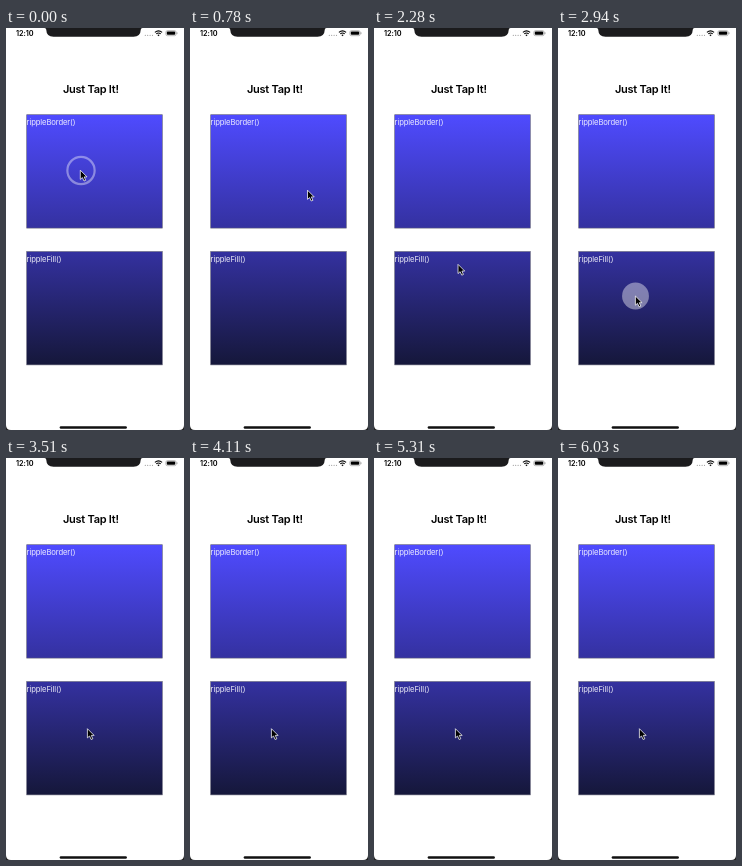
An HTML page that plays this animation: 178 by 402 pixels, repeating every 6060 ms.

```html
<!DOCTYPE html>
<html lang="en">
<head>
<meta charset="utf-8">
<title>Ripple demo</title>
<style>
html, body { margin: 0; width: 100%; height: 100%; overflow: hidden; background: #222; }
svg { display: block; width: 100vw; height: 100vh; }
text { font-family: Inter, "Liberation Sans", sans-serif; }
.label { font-size: 7.7px; letter-spacing: -.13px; fill: #fff; fill-opacity: .9; }
.card { stroke: #66667a; stroke-width: .6; }
</style>
</head>
<body>
<svg viewBox="0 0 178 402" preserveAspectRatio="none">
  <defs>
    <linearGradient id="bright" x2="0" y2="1">
      <stop stop-color="#4f4bff"/><stop offset="1" stop-color="#3431a0"/>
    </linearGradient>
    <linearGradient id="dark" x2="0" y2="1">
      <stop stop-color="#3431a0"/><stop offset="1" stop-color="#15173a"/>
    </linearGradient>
  </defs>
  <path d="M0 0H178V397Q178 402 173 402H5Q0 402 0 397Z" fill="#fff"/>

  <!-- status bar -->
  <path d="M38.5 0Q40.2 0 40.2 1.5Q40.5 8.8 47.5 8.8H127.5Q134.5 8.8 134.8 1.5Q134.8 0 136.5 0Z" fill="#1b1b1d"/>
  <text x="10" y="8.2" font-size="7.3" font-weight="600" letter-spacing="-.05">12:10</text>
  <path d="M139.3 7.3h8" stroke="#999" stroke-width="1.2" stroke-linecap="round" stroke-dasharray="0 2.4"/>
  <g fill="none" stroke="#000" stroke-width="1.1">
    <path d="M148.9 4.4Q152.5 1.4 156.1 4.4M150.3 5.9Q152.5 4.1 154.7 5.9"/>
    <rect x="159.9" y="2.7" width="10.2" height="5" rx="1.5" stroke="#888" stroke-width=".6"/>
  </g>
  <path d="M151.4 7Q152.5 6.1 153.6 7L152.5 8.2Z"/>
  <rect x="160.8" y="3.6" width="8.4" height="3.2" rx=".8"/>
  <path d="M171 4.3v1.8" stroke="#888" stroke-width=".7"/>

  <text x="84.8" y="65.1" font-size="11" font-weight="600" letter-spacing="-.25" text-anchor="middle">Just Tap It!</text>

  <rect class="card" x="20.7" y="86.7" width="135.6" height="113.4" fill="url(#bright)"/>
  <text class="label" x="20.6" y="96.8">rippleBorder()</text>
  <rect class="card" x="20.7" y="223.5" width="135.6" height="113.4" fill="url(#dark)"/>
  <text class="label" x="20.6" y="233.5">rippleFill()</text>

  <rect x="53.7" y="398.3" width="67.2" height="2.4" rx="1.2" fill="#111"/>

  <circle id="ripple"/>
  <path id="cursor" d="M0 0V9.2L2.1 7.3L3.7 10.8L5.4 10.1L3.9 6.7H6.7Z" stroke="#fff" stroke-width=".75" stroke-linejoin="round"/>
</svg>
<script>
const LOOP = 6060, RIPPLE_MS = 500, MAX_RADIUS = 20;
const ripple = document.getElementById('ripple');
const cursor = document.getElementById('cursor');

const taps = [
  { at: -340, x: 75, y: 142.5, border: true },
  { at: 1340, x: 103, y: 148, border: true },
  { at: 2605, x: 77.5, y: 268, border: false },
  { at: 4345, x: 81.2, y: 271, border: false }
];

// Pointer stops: time, x, y
const stops = [
  [0, 74.3, 142.2], [180, 74.3, 142.2], [650, 117.5, 162.2], [850, 117.5, 162.2],
  [1300, 102.5, 148.2], [1850, 102.5, 148.2], [2500, 77.4, 268], [3050, 77.4, 268],
  [3400, 81.4, 270.7], [LOOP, 81.4, 270.7]
];

const smooth = p => p * p * (3 - 2 * p);

function pointerAt(t) {
  const i = stops.findIndex(s => s[0] > t);
  const [t0, x0, y0] = stops[i - 1], [t1, x1, y1] = stops[i];
  const p = smooth((t - t0) / (t1 - t0));
  return [x0 + (x1 - x0) * p, y0 + (y1 - y0) * p];
}

function drawRipple(t) {
  const tap = taps.find(s => t >= s.at && t < s.at + RIPPLE_MS);
  ripple.setAttribute('visibility', tap ? 'visible' : 'hidden');
  if (!tap) return;
  const p = (t - tap.at) / RIPPLE_MS;
  const attrs = {
    cx: tap.x, cy: tap.y, r: MAX_RADIUS * p,
    opacity: Math.min(.8, 1.25 * (1 - p)),
    fill: tap.border ? 'none' : '#fff',
    stroke: tap.border ? '#fff' : 'none',
    'stroke-width': 2.2
  };
  for (const key in attrs) ripple.setAttribute(key, attrs[key]);
}

function render(t) {
  drawRipple(t);
  cursor.setAttribute('transform', `translate(${pointerAt(t)})`);
}

const start = performance.now();
function tick(now) {
  render(Math.max(0, now - start) % LOOP);
  requestAnimationFrame(tick);
}
render(0);
requestAnimationFrame(tick);
</script>
</body>
</html>
```
